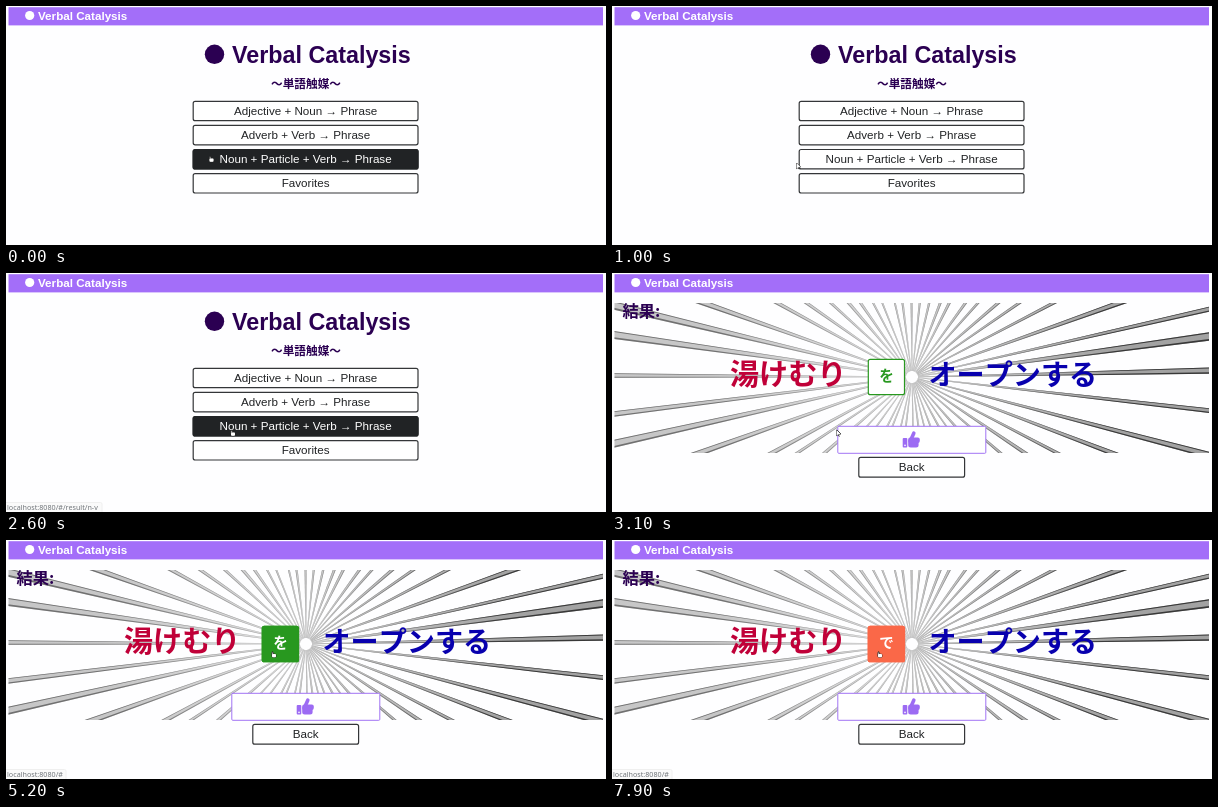
An HTML page with a canvas for the animation above (8000 ms loop, 600 by 239 pixels).

```html
<!DOCTYPE html>
<html lang="ja">
<head>
<meta charset="utf-8">
<style>
html, body { margin: 0; width: 100%; height: 100%; overflow: hidden; background: #fefeff; }
canvas { display: block; width: 600px; height: 239px; }
</style>
</head>
<body>
<canvas id="stage" width="600" height="239"></canvas>
<script>
const ctx = document.getElementById('stage').getContext('2d');
const LOOP = 8000, STEP = 100, FADE = 150;
const OPEN_RESULT = 2750, HOVER_PARTICLE = 4800;
const SANS = '"Liberation Sans", Arial, sans-serif';
const JP = '"Noto Sans CJK JP", "Noto Sans CJK", sans-serif';
const NAME = 'Verbal Catalysis';
const INK = '#2b0052', DARK = '#212325', PURPLE = '#a36ef9';
const HUB = { x: 300, y: 104 };
const RAYS = 52, REACH = 330;

const menu = ['Adjective + Noun → Phrase', 'Adverb + Verb → Phrase',
  'Noun + Particle + Verb → Phrase', 'Favorites'];

const particles = [
  { from: 0, char: 'を', color: '#28981f' },
  { from: 6100, char: 'が', color: '#3f0075' },
  { from: 7600, char: 'で', color: '#fa6848' }
];

const stops = [
  { t: 0, x: 203, y: 150 },
  { t: 450, x: 190, y: 154 },
  { t: 1000, x: 184.5, y: 157 },
  { t: 1800, x: 404, y: 156 },
  { t: 2500, x: 224.5, y: 157 },
  { t: 3200, x: 224.5, y: 157 },
  { t: 3600, x: 184, y: 197 },
  { t: 4100, x: 440, y: 98 },
  { t: 5000, x: 265.5, y: 111.5 },
  { t: LOOP, x: 265.5, y: 111.5 }
];

const clamp = v => Math.min(1, Math.max(0, v));
const ramp = (t, start) => clamp((t - start) / FADE);
const mix = (a, b, k) => a + (b - a) * k;

function seeded(seed) {
  return () => (seed = (seed * 16807) % 2147483647) / 2147483647;
}

const rand = seeded(11);
const rays = Array.from({ length: RAYS }, (_, i) => ({
  angle: (i + (rand() - 0.5) * 0.35) * 2 * Math.PI / RAYS,
  spread: mix(0.012, 0.026, rand())
}));

function text(str, x, y, size, color, { weight = '', family = SANS, align = 'center' } = {}) {
  ctx.font = `${weight} ${size}px ${family}`;
  ctx.textAlign = align;
  ctx.fillStyle = color;
  ctx.fillText(str, x, y);
}

function roundBox(x, y, w, h, radius, fill) {
  ctx.beginPath();
  ctx.roundRect(x, y, w, h, radius);
  ctx.fillStyle = fill;
  ctx.fill();
}

function frameBox(x, y, w, h, fill, stroke, line = 1.2, radius = 2) {
  roundBox(x, y, w, h, radius, fill);
  ctx.strokeStyle = stroke;
  ctx.lineWidth = line;
  ctx.stroke();
}

function dot(x, y, r, color) {
  roundBox(x - r, y - r, 2 * r, 2 * r, r, color);
}

function withAlpha(alpha, draw) {
  if (alpha <= 0) return;
  ctx.save();
  ctx.globalAlpha = alpha;
  draw();
  ctx.restore();
}

function pointerAt(t) {
  const i = Math.max(1, stops.findIndex(s => s.t >= t));
  const a = stops[i - 1], b = stops[i];
  const k = (t - a.t) / (b.t - a.t);
  const eased = k * k * (3 - 2 * k);
  return [mix(a.x, b.x, eased), mix(a.y, b.y, eased)];
}

function shade(near, far) {
  const g = ctx.createRadialGradient(HUB.x, HUB.y, 5, HUB.x, HUB.y, 200);
  g.addColorStop(0, near);
  g.addColorStop(1, far);
  return g;
}

const bodyShade = shade('#d2d2d2', '#a2a2a2');
const edgeShade = shade('#b4b4b4', '#383838');

// Thin sector, cut off close to the hub; offsets are across the ray in px and radians
function sector(px0, rad0, px1, rad1, fill) {
  ctx.beginPath();
  ctx.moveTo(6, px0);
  ctx.lineTo(REACH, px0 + rad0 * REACH);
  ctx.lineTo(REACH, px1 + rad1 * REACH);
  ctx.lineTo(6, px1);
  ctx.fillStyle = fill;
  ctx.fill();
}

function ray({ angle, spread }) {
  const half = spread / 2;
  const lower = Math.cos(angle) > 0 ? 1 : -1;
  withAlpha(0.8 + 0.2 * Math.cos(angle), () => {
    ctx.translate(HUB.x, HUB.y);
    ctx.rotate(angle);
    ctx.scale(1, lower);
    sector(-0.4, -half, 0.4, half, bodyShadeLocal);
    sector(0, half * 0.6, 0.4, half, edgeShadeLocal);
    sector(-0.4, -half, -0.1, -half * 0.8, edgeShadeLocal);
  });
}

function localShade(near, far) {
  const g = ctx.createLinearGradient(0, 0, 200, 0);
  g.addColorStop(0, near);
  g.addColorStop(1, far);
  return g;
}

const bodyShadeLocal = localShade('#d2d2d2', '#a2a2a2');
const edgeShadeLocal = localShade('#b4b4b4', '#383838');

function burst() {
  ctx.save();
  ctx.beginPath();
  ctx.rect(2.5, 30, 594.5, 150);
  ctx.clip();
  rays.forEach(ray);
  ctx.restore();
}

function header() {
  ctx.fillStyle = PURPLE;
  ctx.fillRect(2.5, 1.2, 594.5, 18.2);
  dot(23.7, 9.5, 4.6, '#fff');
  text(NAME, 32, 13.6, 11.65, '#fff', { weight: 'bold', align: 'left' });
}

function menuButton(i, fill, stroke, color) {
  const y = 95.3 + i * 24.1;
  frameBox(187.2, y, 224.8, 19.4, fill, stroke);
  text(menu[i], 299.6, y + 13.8, 11.65, color);
}

function menuPage(t) {
  dot(208.5, 48.3, 9.7, INK);
  text(NAME, 226, 56.6, 23.3, INK, { weight: 'bold', align: 'left' });
  text('〜単語触媒〜', 300, 81.8, 11.65, INK, { weight: 'bold', family: JP });
  menu.forEach((_, i) => menuButton(i, '#fff', '#343638', DARK));
  const hover = t < 1000 ? 1 - ramp(t, 450) : ramp(t, 1100);
  withAlpha(hover, () => menuButton(2, DARK, DARK, '#fff'));
}

function thumb() {
  const color = '#9c6bf3';
  roundBox(290.7, 165, 4.6, 9.6, 1, color);
  dot(293, 172.4, 0.8, '#fff');
  roundBox(296.2, 164.4, 11.6, 5.6, 2, color);
  roundBox(296.2, 166, 10.4, 8.6, 2.5, color);
  ctx.beginPath();
  ctx.moveTo(299, 166.5);
  ctx.lineTo(301.8, 160.2);
  ctx.lineCap = 'round';
  ctx.lineWidth = 3.6;
  ctx.strokeStyle = color;
  ctx.stroke();
}

function particle(t) {
  const { char, color } = particles.filter(p => p.from <= t).pop();
  const draw = (fill, ink) => {
    frameBox(256.3, 86.3, 36.2, 35.4, fill, color);
    text(char, 274.5, 108, 14.6, ink, { weight: 'bold', family: JP });
  };
  draw('#fff', color);
  withAlpha(ramp(t, HOVER_PARTICLE), () => draw(color, '#fff'));
}

function resultPage(t) {
  burst();
  const bold = { weight: 'bold', family: JP, align: 'left' };
  text('結果:', 10.5, 43.8, 16.3, INK, bold);
  text('湯けむり', 118, 112.4, 29.1, '#c00038', bold);
  text('オープンする', 316.5, 112.4, 28.1, '#0800ae', bold);
  particle(t);
  frameBox(225.8, 153.3, 148, 27, '#fff', '#a274f4', 1, 1);
  thumb();
  frameBox(246.8, 184.4, 105.8, 19.8, '#fff', '#343638');
  text('Back', 299.6, 198.4, 11.65, DARK);
}

function status(t) {
  const menuLink = (t >= 100 && t < 850) || (t >= 1200 && t < 3000);
  const link = menuLink ? 'localhost:8080/#/result/n-v'
    : t > HOVER_PARTICLE ? 'localhost:8080/#' : '';
  if (!link) return;
  frameBox(-2, 229.5, menuLink ? 98 : 62, 12, '#fafafa', '#ececec', 0.8, 1.5);
  text(link, 1, 236.5, 7.18, '#70757a', { family: '"Noto Sans", sans-serif', align: 'left' });
}

function hand() {
  frameBox(0.5, 2.6, 4, 3.2, '#fff', '#222', 0.8, 1);
  frameBox(0.4, 0.4, 1.4, 4, '#fff', '#222', 0.8, 0.7);
  roundBox(0.5, 2.6, 4, 3.2, 1, '#fff');
}

function arrow() {
  ctx.beginPath();
  ctx.lineTo(0, 0);
  ctx.lineTo(0, 5.6);
  ctx.lineTo(1.6, 4.4);
  ctx.lineTo(4, 4);
  ctx.closePath();
  ctx.moveTo(1.6, 4.2);
  ctx.lineTo(2.6, 6.2);
  ctx.lineWidth = 1;
  ctx.strokeStyle = '#222';
  ctx.stroke();
  ctx.fillStyle = '#fff';
  ctx.fill();
}

function pointer(t) {
  const overLink = t < 450 || (t >= 1100 && t < OPEN_RESULT) || t >= HOVER_PARTICLE;
  ctx.save();
  ctx.translate(...pointerAt(t));
  if (overLink) hand();
  else arrow();
  ctx.restore();
}

function frame(now) {
  const t = Math.floor((now % LOOP) / STEP) * STEP;
  ctx.fillStyle = '#fefeff';
  ctx.fillRect(0, 0, 600, 239);
  header();
  if (t < OPEN_RESULT) menuPage(t);
  else resultPage(t);
  status(t);
  pointer(t);
  requestAnimationFrame(frame);
}
requestAnimationFrame(frame);
</script>
</body>
</html>
```
